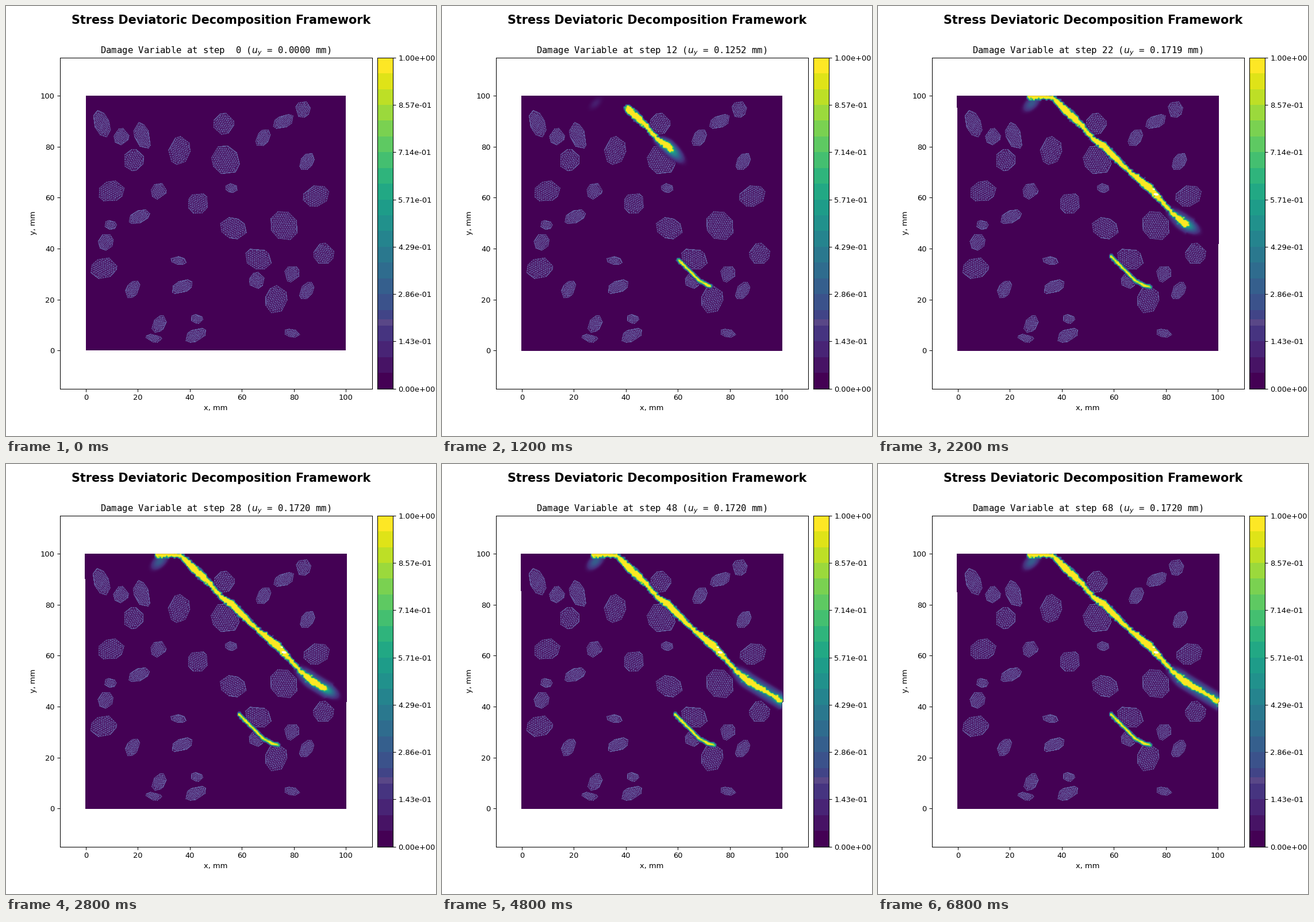
Write a matplotlib script that moves like this. It is 748x748 px and loops after 8600 ms.

```python
import numpy as np
import matplotlib.pyplot as plt
from matplotlib.animation import FuncAnimation
from matplotlib.colors import ListedColormap
from matplotlib.patches import Ellipse, Polygon
from matplotlib.path import Path
from matplotlib.tri import Triangulation

INCHES, DPI = 8, 93.5
LAST_STEP = 68
FRAMES = 86
CELL = 0.6
plt.rcParams.update({"font.family": "DejaVu Sans", "font.size": 10})
rng = np.random.default_rng(4)
viridis = plt.get_cmap("viridis")

# Grain shape (long half axis, short half axis, tilt) -> centres
GRAINS = {
    (5.8, 5.0, -60): [(53.7, 74.7), (76.2, 49)],
    (5.4, 4.0, 80): [(36, 78.5), (73.2, 20)],
    (5.3, 2.8, -70): [(6.2, 89), (21.7, 84.3)],
    (5.1, 3.9, -22): [(56.7, 48), (66.3, 36)],
    (5.0, 3.9, 20): [(9.8, 62.5), (88.5, 60.7), (6.9, 32.3)],
    (4.1, 3.8, 70): [(18.4, 74.8), (53, 89), (91.5, 38), (43.2, 57.8)],
    (3.2, 2.8, 70): [(13.7, 84), (83.4, 94.7), (79.2, 30.1),
                     (28, 62.6), (7.7, 42.6), (65.7, 27.5)],
    (2.3, 1.7, -10): [(42.7, 12.4), (56, 63.8), (9.5, 49.3)],
    (4.2, 2.3, 24): [(20.5, 52.5), (37, 25), (42.2, 6), (76, 89.9)],
    (3.6, 2.3, 58): [(68.1, 83.5), (85, 74.2), (18, 24), (28.2, 10.4), (84.9, 23.5)],
    (3.0, 1.5, -10): [(35.7, 35.3), (26.2, 4.8), (79.2, 6.8)],
}

# Bends of the two cracks
MAIN = np.array([(28, 99.8), (36.5, 99.3), (48.4, 87.6), (52.4, 82.7), (56, 80.3),
                 (65.5, 70.8), (75, 62.6), (82.5, 54), (87, 50.2), (101, 41.5)])
SIDE = np.array([(59, 37), (64, 31.9), (68.5, 27.3), (72, 25.4), (74, 25)])


def rotate(pts, angle):
    c, s = np.cos(angle), np.sin(angle)
    return pts @ np.array([[c, s], [-s, c]])


def grain_edges(center, a, b, tilt):
    """Segments of a triangle mesh filling one convex grain."""
    n = 8 if a > 3.3 else 7
    t = (np.arange(n) + rng.uniform(-0.3, 0.3, n)) * 2 * np.pi / n
    poly = rotate(np.c_[a * np.cos(t), b * np.sin(t)] * 1.04, np.radians(tilt))
    h = np.clip(0.25 * b, 0.65, 0.85)

    rim = []
    for p, q in zip(poly, np.roll(poly, -1, axis=0)):
        k = max(1, round(np.hypot(*(q - p)) / h))
        rim += [p + (q - p) * j / k for j in range(k)]

    m = int(a / h) + 3
    i, j = np.meshgrid(np.arange(-m, m + 1), np.arange(-m, m + 1))
    grid = np.c_[(i + 0.5 * (j % 2)).ravel() * h, j.ravel() * h * 0.866]
    grid = rotate(grid, rng.uniform(0, np.pi / 3)) + rng.normal(0, 0.06 * h, grid.shape)
    core = Path(poly * (1 - 0.5 * h / b))
    pts = np.vstack([rim, grid[core.contains_points(grid)]]) + center
    return pts[Triangulation(*pts.T).edges]


def nearest(path, gx, gy):
    """Distance to a polyline and x of the closest point on it."""
    xs = np.linspace(path[0, 0], path[-1, 0], 400)
    dist = np.full(gx.shape, 1e9)
    foot = np.zeros(gx.shape)
    for x, y in zip(xs, np.interp(xs, *path.T)):
        d = np.hypot(gx - x, gy - y)
        closer = d < dist
        dist[closer] = d[closer]
        foot[closer] = x
    return dist, foot


def crack(dist, foot, low, high, half, fall):
    """Full damage within half a width of the path, fading over the fall."""
    over = np.maximum(0, np.maximum(foot - high, low - foot))
    return np.clip((half + fall - np.hypot(dist, over)) / fall, 0, 1)


def bump(u, v):
    return np.exp(-u ** 2 - v ** 2)


nodes = np.arange(0, 100.9, CELL)
GX, GY = np.meshgrid(nodes, nodes)
main_dist, main_foot = nearest(MAIN, GX, GY)
side_dist, side_foot = nearest(SIDE, GX, GY)
rough = rng.normal(0, 0.2, GX.shape)
main_half = 0.8 + 0.3 * np.cos(2 * np.pi * (main_foot - 43) / 15) + rough
side_half = 0.27 + 0.5 * rough


def damage(step):
    if step < 11:
        return np.zeros(GX.shape)
    low = 28.5 + 27.5 * np.exp(-(step - 10) / 2.6)
    if step < 22:
        high = 87.5 - 3.07 * (22 - step)
    else:
        high = 87.5 + 15 * (1 - np.exp(-(step - 22) / 18))
    grown = 1 - np.exp(-(step - 10) / 5)

    body = crack(main_dist, main_foot, low, high, main_half, 0.65)
    tip = 0.6 * bump((main_foot - high) / 4, main_dist / 2.1)
    wake = 0.4 * np.clip((main_foot - 80) / 6, 0, 1) * np.exp(-(main_dist / 2.6) ** 2)
    wake *= main_foot < high + 2
    u, v = GX - 28.5 + GY - 97, GX - 28.5 - GY + 97
    start = 0.28 * grown * bump(u / 5.5, v / 3)

    reach = min(8, 3 * (step - 10))
    side = crack(side_dist, side_foot, 66.5 - reach, 66.5 + reach, side_half, 0.65)
    return np.max([body, tip, wake, start, side], axis=0)


def displacement(step):
    rise = max(0.0036 * step, 0.0252 + 0.02 * (step - 7))
    return min(rise, 0.172 - 0.0003 * np.exp(-(step - 15) / 6))


fig = plt.figure(figsize=(INCHES, INCHES), dpi=DPI, facecolor="white")
fig.suptitle("Stress Deviatoric Decomposition Framework", fontsize=16, weight="bold")

# The colour bar takes 5 % of the plot's width after a gap of 0.1 inch
gap = 0.1 / INCHES
width = (0.775 - gap) / 1.05
ax = fig.add_axes([0.125, 0.11, width, 0.77])
bar = fig.add_axes([0.125 + width + gap, 0.11, 0.05 * width, 0.77])
title = ax.set_title("", fontsize=12, family="DejaVu Sans Mono")

plate = Polygon([(0, 0), (100, 0), (100, 100), (0, 100)], color=viridis(0.0),
                lw=0, antialiased=False, zorder=1)
ax.add_patch(plate)

edges = np.vstack([grain_edges(c, *shape) for shape, centres in GRAINS.items()
                   for c in centres])
breaks = np.full((len(edges), 1), np.nan)
mesh_x = np.hstack([edges[:, :, 0], breaks]).ravel()
mesh_y = np.hstack([edges[:, :, 1], breaks]).ravel()
upper = mesh_y > np.interp(mesh_x, *MAIN.T, left=101)
mesh, = ax.plot(mesh_x, mesh_y, color="#6a6cac", lw=0.45, alpha=0.9, zorder=2)

# Undamaged zones stay clear so the grains show through
colors = viridis(np.linspace(0, 1, 256))
colors[:, 3] = np.clip((np.arange(256) - 4) / 24, 0, 1)
rim = (-CELL / 2, nodes[-1] + CELL / 2)
image = ax.imshow(np.zeros(GX.shape), cmap=ListedColormap(colors), vmin=0, vmax=0.92,
                  origin="lower", aspect="auto", interpolation="bilinear",
                  extent=rim * 2, zorder=3)
image.set_clip_path(plate)
holes = [ax.add_patch(Ellipse(xy, w, 0.45 * w, angle=-10, color="white", lw=0, zorder=4))
         for xy, w in [((76.2, 61.3), 1.9), ((75.3, 63.3), 1.0)]]

ax.set(xlim=(-10, 110), ylim=(-15, 115), xlabel="x, mm", ylabel="y, mm",
       xticks=range(0, 101, 20), yticks=range(0, 101, 20))

for k in range(21):
    bar.axhspan(k / 21, (k + 1) / 21, color=viridis(k / 20), lw=0, antialiased=False)
bar.axhspan(0, 0.03, color=viridis(0.0), lw=0, antialiased=False)
bar.axhspan(4 / 21, 0.21, color="#594787", lw=0, antialiased=False)
bar.set(xlim=(0, 1), ylim=(0, 1), xticks=[])
bar.yaxis.tick_right()
bar.set_yticks(np.arange(8) / 7, [f"{k / 7:.2e}" for k in range(8)])


def draw(frame):
    step = min(frame, LAST_STEP)
    right = 0.0075 * step
    left = 0.2 * (1 - np.exp(-step / 10))
    plate.set_xy([(0, 0), (100, 0), (100, 41.5), (100 + right, 42),
                  (100 + right, 100), (-left, 100)])
    mesh.set_xdata(mesh_x + np.where(upper, right, -left * mesh_y / 100))
    image.set_data(damage(step))
    for hole in holes:
        hole.set_visible(step >= 20)
    title.set_text(f"Damage Variable at step {step:2d} ($u_y$ = {displacement(step):.4f} mm)")
    return plate, mesh, image, title


anim = FuncAnimation(fig, draw, frames=FRAMES, interval=100, repeat=True, repeat_delay=0)
plt.show()
```
